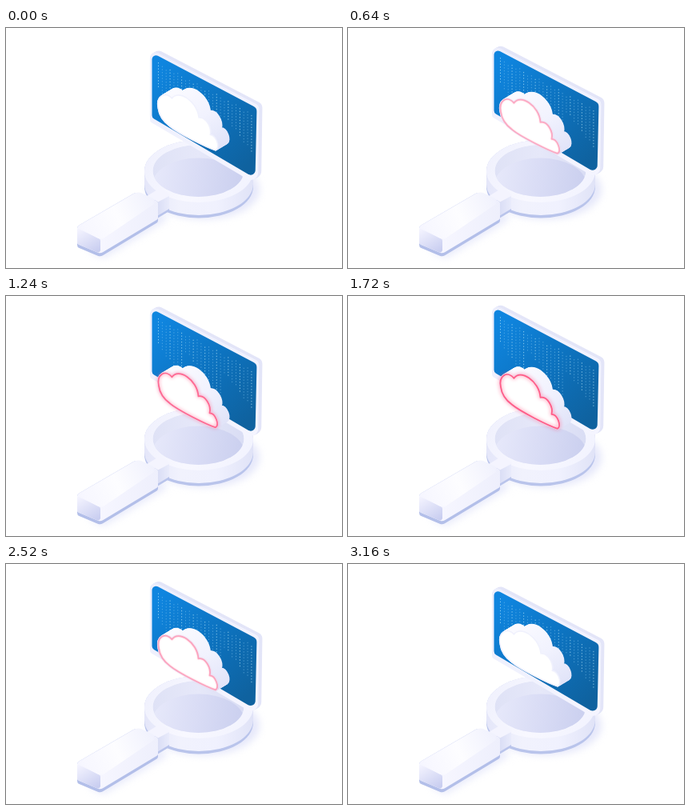
An HTML page with a canvas for the animation above (3200 ms loop, 420 px wide and 300 px high).

```html
<!DOCTYPE html>
<html lang="en">
<head>
<meta charset="utf-8">
<title>Cloud search</title>
<style>
html, body { margin: 0; width: 100%; height: 100%; overflow: hidden; background: #fff; }
canvas { display: block; }
</style>
</head>
<body>
<canvas id="stage" width="420" height="300"></canvas>
<script>
const ctx = document.getElementById('stage').getContext('2d');
const LOOP = 3200;

function gradient(x0, y0, x1, y1, ...colors) {
  const g = ctx.createLinearGradient(x0, y0, x1, y1);
  colors.forEach((c, i) => g.addColorStop(i / (colors.length - 1), c));
  return g;
}

// Polygon with rounded corners; r is one radius or one per corner
function poly(points, r = 0) {
  const p = new Path2D();
  const n = points.length;
  const [a, b] = [points[n - 1], points[0]];
  p.moveTo((a[0] + b[0]) / 2, (a[1] + b[1]) / 2);
  points.forEach(([x, y], i) => {
    const next = points[(i + 1) % n];
    p.arcTo(x, y, next[0], next[1], Array.isArray(r) ? r[i] : r);
  });
  p.closePath();
  return p;
}

function ellipse(x, y, rx, ry) {
  const p = new Path2D();
  p.ellipse(x, y, rx, ry, 0, 0, Math.PI * 2);
  return p;
}

function fill(path, color) {
  ctx.fillStyle = color;
  ctx.fill(path);
}

function shifted(dx, dy, draw) {
  ctx.save();
  ctx.translate(dx, dy);
  draw();
  ctx.restore();
}

// Solid drum: an ellipse swept downwards
function drum(x, y, rx, ry, h, color) {
  const p = new Path2D();
  p.ellipse(x, y, rx, ry, 0, Math.PI, 0);
  p.ellipse(x, y + h, rx, ry, 0, 0, Math.PI);
  p.closePath();
  fill(p, color);
}

function drawShadow() {
  ctx.save();
  ctx.filter = 'blur(5px)';
  fill(ellipse(247, 202, 70, 37), '#e6e8fa');
  fill(poly([[98, 276], [180, 228], [208, 236], [122, 288]], 5), '#e9ebfb');
  ctx.restore();
}

function drawHandle() {
  fill(poly([[89, 248], [163, 205], [190, 217], [190, 242.5], [118, 286], [89, 274]], [4, 8, 3, 3, 7, 4]), '#b3bfe9');
  fill(poly([[89, 248], [163, 205], [190, 217], [190, 239], [118, 282], [89, 270]], [4, 8, 3, 3, 7, 4]),
    gradient(118, 0, 190, 0, '#f6f6ff', '#eeeffc'));
  fill(poly([[89, 250], [118, 264], [118, 282], [89, 270]], [2, 3, 3, 3]),
    gradient(94, 251, 112, 281, '#f2f2fe', '#c8cdf0'));
  fill(poly([[89, 249], [165, 204.5], [191, 216], [119, 265]], [5, 9, 5, 8]),
    gradient(92, 255, 185, 212, '#f6f6ff', '#fdfdff', '#f0f1fd'));
}

function drawNeck() {
  fill(poly([[189, 216], [204, 209], [204, 229], [189, 238]]), '#b9c4eb');
  fill(poly([[189, 216], [204, 209], [204, 226], [189, 235]]), gradient(189, 0, 204, 0, '#d9ddf5', '#e9ebfb'));
  fill(poly([[176, 210], [193, 200], [206, 209], [189, 218]], 1), '#f4f4fe');
}

function drawLens() {
  drum(241, 179, 68, 39, 19.5, '#b9c4eb');
  drum(241, 179, 68, 39, 16, gradient(173, 0, 309, 0, '#e4e6f9', '#f1f2fd', '#f0f1fe', '#e0e3f7'));
  fill(ellipse(241, 179, 68, 39), gradient(180, 150, 300, 210, '#f0f1fd', '#f8f8ff', '#f2f3fe'));
  const hole = ellipse(240.5, 178.5, 57, 32.5);
  ctx.save();
  ctx.clip(hole);
  fill(hole, gradient(184, 0, 297, 0, '#dfe2f6', '#e6e8f9', '#d9ddf4'));
  fill(ellipse(240.5, 195, 57, 32.5), gradient(186, 180, 294, 195, '#e6e8fa', '#d9dcf5', '#cbd0ef'));
  ctx.restore();
}

const frame = poly([[180, 26], [316.5, 97], [315, 196.5], [180, 117]], [7, 8, 9, 4]);
const panel = poly([[182.5, 31], [313.5, 100], [311.5, 188], [182.5, 112]], [5, 7, 6, 5]);

function drawDots() {
  for (let i = 0; i < 25; i++) {
    const x = 190 + i * 4.85;
    const top = 31 + (x - 182.5) * 0.54 + 8 + (i * 7 % 5);
    const count = 6 + (i * 11 + 3) % 10;
    ctx.fillStyle = i % 3 ? 'rgba(140,205,245,.5)' : 'rgba(185,232,250,.7)';
    for (let k = 0; k < count; k++) ctx.fillRect(x, top + k * 3.7, 1, 1.3);
  }
}

function drawScreen() {
  for (let s = 4; s > 0; s--) shifted(s, -s / 2, () => fill(frame, '#e3e5f8'));
  fill(frame, gradient(180, 30, 316, 190, '#eceefc', '#f5f5ff'));
  fill(panel, gradient(190, 50, 308, 165, '#0f85df', '#0d73c0', '#0f629f'));
  drawDots();
}

const cloud = new Path2D('M191 100C188 86 199 79 207.5 89C215 77 239 92 240.5 113C249 111 257 125 254.5 134C262 134 267 149 262 152C250 148 216 131 205 122C197 116 192 108 191 100Z');

function drawCloud(glow) {
  ctx.lineJoin = 'round';
  ctx.lineWidth = 3;
  const side = gradient(215, 75, 272, 150, '#fafaff', '#f1f2fe', '#e0e3f8');
  for (let s = 14; s >= 0; s -= 0.5) {
    shifted(s, -s * 0.6, () => {
      ctx.strokeStyle = side;
      ctx.stroke(cloud);
      fill(cloud, side);
    });
  }
  ctx.strokeStyle = '#f0f1fd';
  ctx.stroke(cloud);
  fill(cloud, '#fff');
  ctx.save();
  ctx.globalAlpha = glow;
  ctx.lineWidth = 1.8;
  ctx.strokeStyle = '#ff5c88';
  ctx.shadowColor = '#ff5c88';
  ctx.shadowBlur = 5 * glow;
  ctx.stroke(cloud);
  ctx.restore();
}

function render(now) {
  const lift = (1 - Math.cos(now / LOOP * Math.PI * 2)) / 2;
  ctx.clearRect(0, 0, 420, 300);
  drawShadow();
  drawLens();
  drawNeck();
  drawHandle();
  shifted(0, -17 * lift, drawScreen);
  shifted(0, 14 * lift, () => drawCloud(lift));
}

let start;
function tick(now) {
  start ??= now;
  render((now - start) % LOOP);
  requestAnimationFrame(tick);
}
render(0);
requestAnimationFrame(tick);
</script>
</body>
</html>
```
